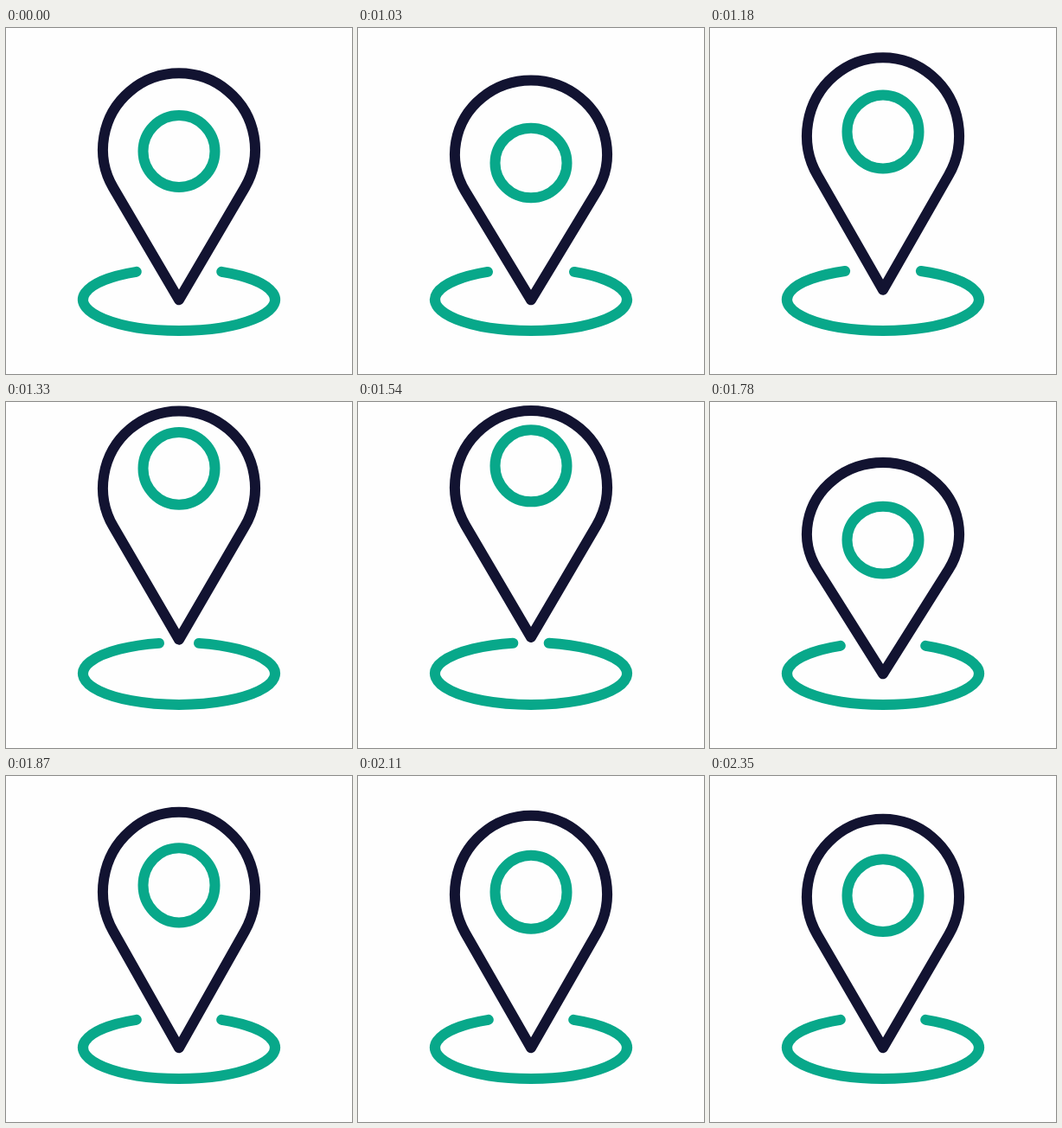
An HTML page that plays this animation: 400x400 px, repeating every 2380 ms.

```html
<!DOCTYPE html>
<html lang="en">
<head>
<meta charset="utf-8">
<title>Map pin</title>
<style>
  html, body { margin: 0; width: 100%; height: 100%; overflow: hidden; background: #fefefe; }
  svg { display: block; width: 100vw; height: 100vh; }
  svg * { fill: none; stroke-width: 12; stroke-linecap: round; stroke-linejoin: round; }
  #ground, #ring { stroke: #08a88a; }
  #pin { stroke: #121331; }
</style>
</head>
<body>
<svg viewBox="0 0 400 400">
  <path id="ground"/>
  <ellipse id="ring" cx="200" rx="41.5"/>
  <path id="pin"/>
</svg>
<script>
  const LOOP = 2380, START = 1030, STEP = 30;
  const CROUCH = 995, JUMP = 1150, APEX = 1450, DROP = 1540, LAND = 1690, BOUNCE = 180;
  const HOP = 42.4;
  const [ground, ring, pin] = ['ground', 'ring', 'pin'].map(id => document.getElementById(id));

  const ramp = (t, from, to) => Math.min(1, Math.max(0, (t - from) / (to - from)));
  const pulse = (t, from, to) => Math.sin(Math.PI * ramp(t, from, to));

  // 0 on the ground, 1 while hovering
  const lift = t => (1 - (1 - ramp(t, JUMP, APEX)) ** 3) * (1 - ramp(t, DROP, LAND) ** 2);

  // Grows during the fall, swings once after landing, then settles
  function bounce(t, peak, rebound, settle) {
    const s = t - LAND;
    if (s < 0) return peak * ramp(t, DROP, LAND) ** 2;
    if (s > BOUNCE) return rebound * settle(s - BOUNCE);
    const n = s / BOUNCE;
    return peak * (rebound / peak) ** n * Math.cos(2 * Math.PI * n);
  }

  function drawPin(rise, stretch) {
    const k = 1 + stretch / 262;
    const tip = 314.3 - rise;
    const shoulder = tip - 129.4 * k;
    pin.setAttribute('d', `M200 ${tip}L124.1 ${shoulder}A88 ${88 * k} 0 1 1 275.9 ${shoulder}Z`);
  }

  function drawGround(gap) {
    const y = 314 - 35.9 * Math.sqrt(1 - (gap / 111) ** 2);
    ground.setAttribute('d', `M${200 - gap} ${y}A111 35.9 0 1 0 ${200 + gap} ${y}`);
  }

  function draw(t) {
    const rise = HOP * lift(t);
    const crouch = 12.6 * pulse(t, CROUCH, JUMP);
    const launch = 14 * pulse(t, JUMP, 1340);
    const stretch = launch - crouch + bounce(t, 30, 10.5, s => 1 - s / 630);

    drawPin(rise, stretch);
    // The ring exaggerates the movement of the pin
    const swing = bounce(t, 18, 16.2, s => Math.exp(-s / 360));
    ring.setAttribute('cy', 142.5 + 1.65 * crouch - 1.62 * rise - 0.6 * launch - swing);
    ring.setAttribute('ry', 41.5 + 0.15 * stretch);
    drawGround(49.2 + 0.1 * crouch - 28.5 * lift(t - 10));
  }

  const begin = performance.now();
  function tick() {
    const t = (performance.now() - begin) % LOOP;
    draw(t < START ? 0 : START + Math.floor((t - START) / STEP) * STEP);
    requestAnimationFrame(tick);
  }
  tick();
</script>
</body>
</html>
```
